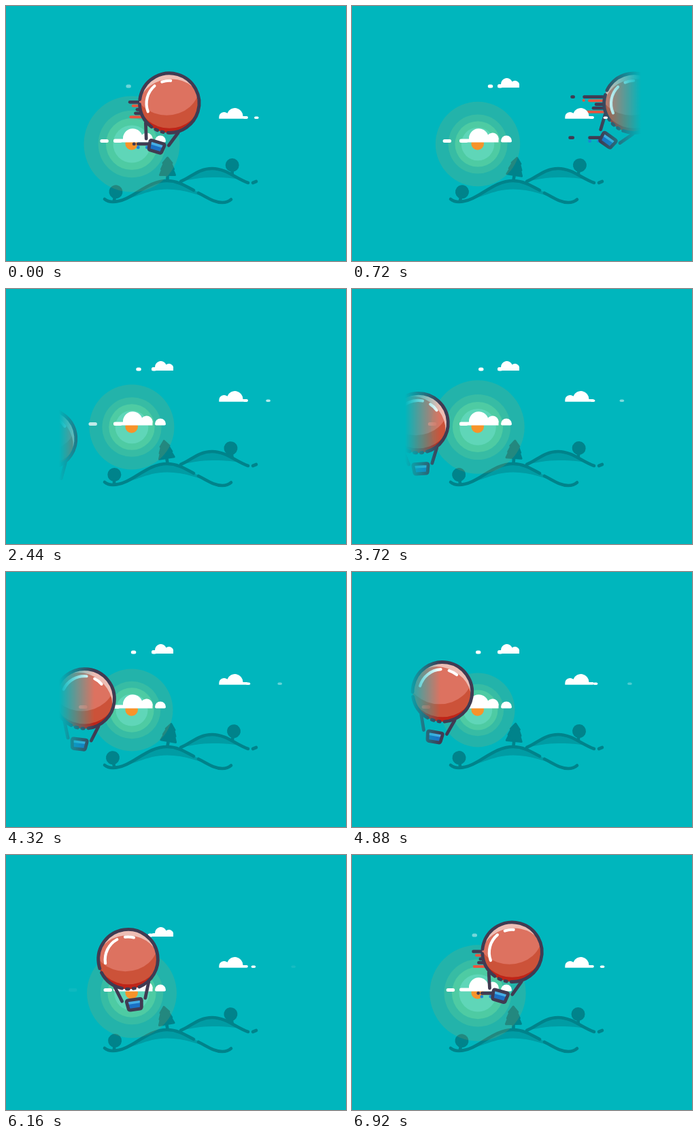
These frames come from a looping animation (500x375 px, 6960 ms). An HTML page:

```html
<!DOCTYPE html>
<html lang="en">
<head>
<meta charset="utf-8">
<title>Balloon flight</title>
<style>
  html, body { margin: 0; width: 100%; height: 100%; overflow: hidden; background: #00b6bd; }
  svg { display: block; width: 100vw; height: 100vh; }
  .line { fill: none; stroke-linecap: round; stroke-linejoin: round; }
  .land { stroke: #00838b; stroke-width: 4.6; }
  .shade { fill: #009ca4; }
  .leaf { fill: #00838b; }
  .cloud { fill: #fff; }
  .dark { stroke: #403b52; stroke-width: 4.8; }
  .red { stroke: #e8553f; stroke-width: 4; }
  .blue { stroke: #1b86d6; stroke-width: 4.6; }
  .white { stroke: #fff; stroke-width: 4.2; }
</style>
</head>
<body>
<svg viewBox="0 0 500 375">
  <defs>
    <linearGradient id="fade">
      <stop offset=".156" stop-color="#fff" stop-opacity="0"/>
      <stop offset=".26" stop-color="#fff"/>
      <stop offset=".73" stop-color="#fff"/>
      <stop offset=".85" stop-color="#fff" stop-opacity="0"/>
    </linearGradient>
    <mask id="window" maskUnits="userSpaceOnUse" x="0" y="0" width="500" height="375">
      <rect width="500" height="375" fill="url(#fade)"/>
    </mask>
    <clipPath id="ball"><circle r="44"/></clipPath>
  </defs>

  <!-- hills -->
  <path class="shade" d="M260 257C272 252 283 239 303 239C320 239 333 248 343 255C325 252 318 252 303 252C285 252 275 255 260 257Z"/>
  <path class="line land" d="M257 258C272 252 283 239 303 239C324 239 338 254 356 260M363 260L368 258"/>
  <path class="shade" d="M157 288C185 288 205 257 237 257C265 257 290 283 314 289C285 278 262 269.5 237 269.5C205 269.5 185 286 157 288Z"/>
  <path class="line land" d="M145 284Q150 288 157 288C185 288 205 257 237 257C252 257 263 264 276 271M283 275C297 282 306 289 318 289Q326 289 331 284.5"/>

  <!-- trees -->
  <g id="leftTree"><circle class="leaf" cy="-13" r="10"/><path class="line land" d="M0 0V-8"/></g>
  <g id="rightTree"><circle class="leaf" cy="-14" r="10"/><path class="line land" d="M0 0V-8"/></g>
  <g id="pine">
    <path class="leaf" stroke="#00838b" stroke-width="3" stroke-linejoin="round"
      d="M0-33L6.5-25L5.5-24L9-16L8-15L11-7.5H-11L-8-15L-9-16L-5.5-24L-6.5-25Z"/>
    <path class="line land" d="M0 0V-8"/>
  </g>

  <!-- sun -->
  <g id="rings" transform="translate(185 203)">
    <circle fill="#f7a53c" fill-opacity=".14"/>
    <circle fill="#82dc8c" fill-opacity=".22"/>
    <circle fill="#78e6a0" fill-opacity=".35"/>
    <circle fill="#78e6d7" fill-opacity=".4"/>
  </g>
  <circle cx="184.7" cy="202.4" r="9.3" fill="#f7932a"/>

  <!-- clouds behind the balloon -->
  <g class="cloud">
    <g id="sunDashes"></g>
    <g transform="translate(0 -.5)">
      <path d="M160.5 201a2.5 2.5 0 0 1 0-5H172A14.5 14.5 0 0 1 200 190A9 9 0 0 1 215.5 198V201Z"/>
      <path d="M221 201a2 2 0 0 1-2-2a8 8 0 0 1 16 0a2 2 0 0 1-2 2Z"/>
    </g>
    <g id="topDashes"></g>
    <path transform="translate(0 -.5)" d="M216.5 120.5a2.5 2.5 0 0 1 0-5H219A8.6 8.6 0 0 1 235.5 111.8A6.5 6.5 0 0 1 246 118V120.5Z"/>
  </g>

  <!-- balloon -->
  <g mask="url(#window)">
    <g id="balloon">
      <g id="streaks" class="line"></g>
      <g id="puffs" class="line">
        <path class="dark" d="M-91-1H-89"/>
        <path class="red" d="M-74 4h.1"/>
      </g>
      <g id="trail" class="line">
        <path id="trailLine" class="dark"/>
        <path id="trailDot" class="dark"/>
        <path class="blue" d="M-27 2h.1M-14 2h.1"/>
      </g>
      <g id="lean">
        <path class="line dark" d="M-25 38L-17.5 60M25 38L17 60"/>
        <path fill="#1c70c4" d="M-11 60H11L9 74H-9Z"/>
        <path fill="#45aee6" d="M-10 61H10L9.5 66H-9.5Z"/>
        <path class="line dark" d="M-9 60H9Q11.5 60 11 63L9.8 72Q9.4 74.5 7 74.5H-7Q-9.4 74.5-9.8 72L-11 63Q-11.5 60-9 60Z"/>
      </g>
      <g clip-path="url(#ball)">
        <circle r="44" fill="#cc5239"/>
        <ellipse cx="-4" cy="-24" rx="48" ry="42" fill="#dd7260"/>
        <path fill="#bf2418" d="M-44 0A44 44 0 0 0 44 0A44 37 0 0 1-44 0Z"/>
      </g>
      <g id="shine">
        <path fill="#edbeb5" d="M-44 0A44 44 0 0 1 44 0A44 35 0 0 0-44 0Z"/>
        <path class="line white" d="M-33 8A34 34 0 0 1-18-28M-6.5-32.3A33 33 0 0 1 6.5-32.3"/>
      </g>
      <circle id="rim" class="line dark" r="43.8" pathLength="360" stroke-dasharray="76 9 3 9 4 9 51 9 190 0"/>
    </g>
  </g>

  <!-- cloud in front of the balloon -->
  <g class="cloud">
    <g id="sideDashes"></g>
    <path transform="translate(0 -.3)" d="M313.3 166V164A7.5 7.5 0 0 1 325.5 158A11.9 11.9 0 0 1 348.5 162.3H354a1.85 1.85 0 0 1 0 3.7Z"/>
  </g>
</svg>
<script>
// All times are in seconds.
const PERIOD = 6.96;
const TAU = 2 * Math.PI;
const $ = id => document.getElementById(id);
const clamp = v => Math.min(1, Math.max(0, v));
const show = (id, opacity) => $(id).setAttribute("opacity", clamp(opacity));
const place = (id, x, y, turn = 0) =>
  $(id).setAttribute("transform", `translate(${x} ${y}) rotate(${turn})`);

function add(parent, tag, attrs) {
  const el = document.createElementNS("http://www.w3.org/2000/svg", tag);
  for (const key in attrs) el.setAttribute(key, attrs[key]);
  parent.append(el);
  return el;
}

// A dash breaks off its cloud, drifts away and fades, outliving one loop.
function drift(id, box, { start, x, speed, accel, life, fade }) {
  const rects = [0, 1, 2].map(() => add($(id), "rect", { ...box, rx: box.height / 2 }));
  return t => rects.forEach((rect, i) => {
    const age = Math.max(0, t + i * PERIOD - start);
    rect.setAttribute("x", x + speed * age + accel * age * age);
    rect.setAttribute("opacity", clamp((life - age) / fade));
  });
}

const drifts = [
  drift("sunDashes", { y: 196, width: 12.5, height: 5 },
    { start: 3.7, x: 158, speed: -5.5, accel: -.16, life: 9.7, fade: 5.5 }),
  drift("topDashes", { y: 115.5, width: 7.5, height: 5 },
    { start: 5.3, x: 214, speed: -6.6, accel: .26, life: 9.3, fade: 1.6 }),
  drift("sideDashes", { y: 162.4, width: 6.5, height: 3.6 },
    { start: 3, x: 349, speed: 2.2, accel: .47, life: 10.6, fade: 5.9 })
];

const streaks = Array.from({ length: 5 }, (_, i) => ({
  y: -1 + 5.5 * i,
  reach: 64 + 9 * Math.cos(1.4 * i),
  el: add($("streaks"), "path", { class: i % 3 === 1 ? "red" : "dark" })
}));

const rings = [...$("rings").children];
const ringScale = [1, .7, .54, .39];

function drawScene(t) {
  const turn = TAU * t / PERIOD;
  const radius = 62.5 + 8.4 * Math.cos(2 * turn + .3);
  rings.forEach((ring, i) => ring.setAttribute("r", radius * ringScale[i]));

  const sway = 9.5 * Math.sin(2 * turn);
  place("leftTree", 159, 286, 2 + 11 * Math.cos(turn - .59));
  place("rightTree", 332.7, 248, sway);
  place("pine", 237.5, 256, sway);
  drifts.forEach(move => move(t));
}

// A slow climb from the left ends in a dash to the right.
function drawBalloon(t) {
  const x = 59 + 30 * (t - 2.44) + 198 * Math.exp((t - 7.68) / .49);
  const y = 142.7 + 18 * Math.max(0, 6.75 - t);
  const rush = 1 - (1 - clamp((t - 6.25) / 1.43)) ** 1.4;
  const lean = 10 * Math.sin(2 * TAU * (t - 3.9) / PERIOD) + 30 * Math.sqrt(rush);
  const roll = 16.5 + 28.5 * Math.cos(Math.PI * clamp((t - 3.3) / 4.4));

  place("balloon", x, y);
  place("lean", 0, 0, lean);
  place("rim", 0, 0, lean);
  place("shine", 0, 0, roll);

  const rise = Math.min(3, 20 * (.6 - rush));
  place("streaks", 0, rise);
  place("puffs", 0, rise);
  show("streaks", rush * 50);
  show("puffs", (rush - .7) * 4);
  for (const s of streaks) s.el.setAttribute("d", `M${-34 - (s.reach - 34) * rush} ${s.y}H-32`);

  const angle = lean * Math.PI / 180;
  const extra = Math.max(0, rush - .6);
  place("trail", -66 * Math.sin(angle), 66 * Math.cos(angle));
  show("trail", rush * 4);
  show("trailDot", (rush - .4) * 20);
  $("trailLine").setAttribute("d", `M${-27 * clamp(rush / .6)}-3H-8`);
  $("trailDot").setAttribute("d", `M${-32 - extra * 60}-3H${-31.9 - extra * 50}`);
}

function frame(now) {
  const t = now / 1000 % PERIOD;
  drawScene(t);
  drawBalloon(t < 1.2 ? t + PERIOD : t);
  requestAnimationFrame(frame);
}
frame(0);
</script>
</body>
</html>
```
